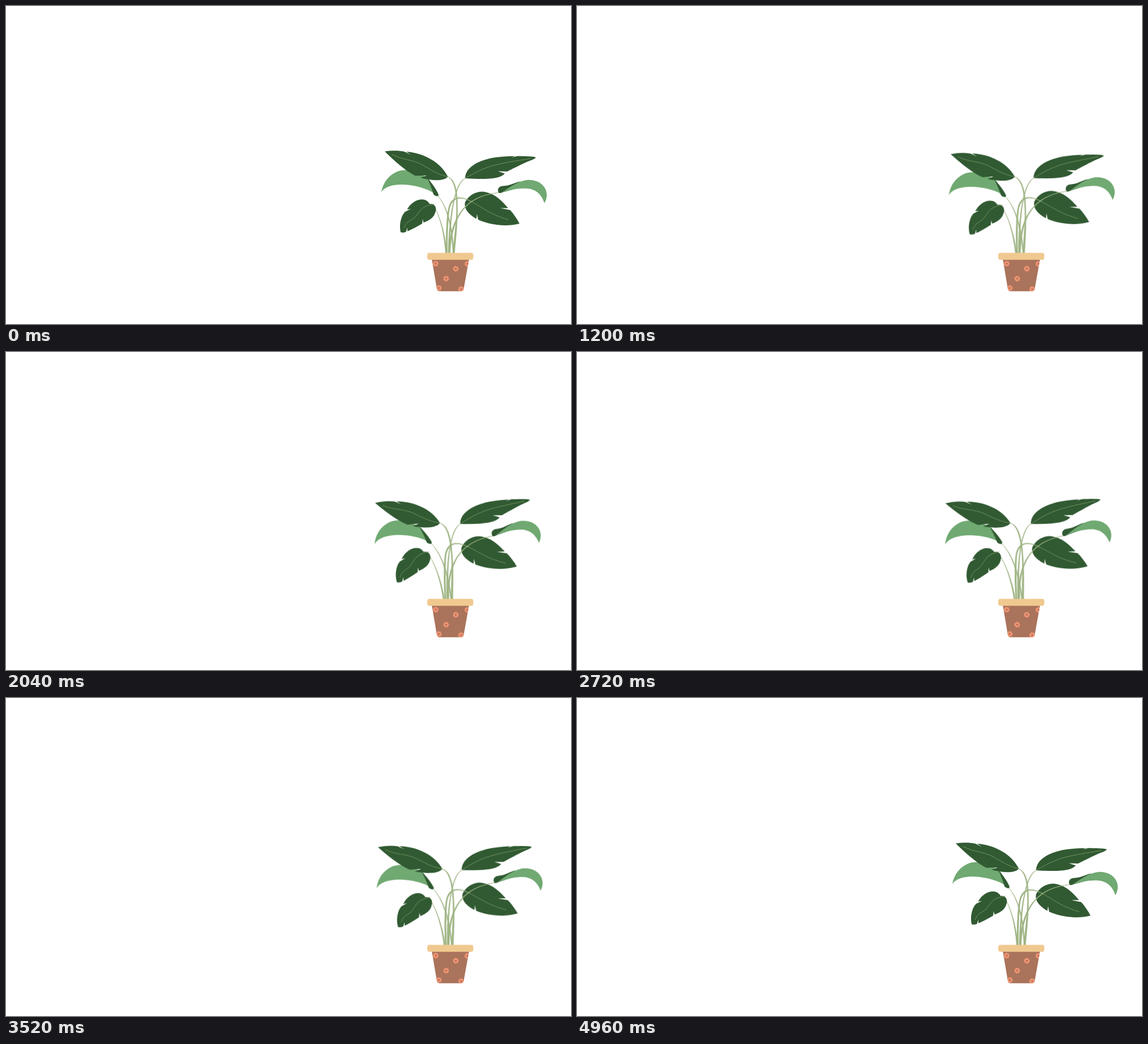
Recreate the animation shown at these times as an HTML page without scripts. Size 998x561 px, loop 5000 ms.

```html
<!DOCTYPE html>
<html lang="en">
<head>
<meta charset="utf-8">
<title>Swaying plant</title>
<style>
  html, body { margin: 0; width: 100%; height: 100%; overflow: hidden; background: #fff; }
  svg { display: block; width: 100%; height: 100%; }
  .dark { fill: #315a32; }
  .light { fill: #70a972; }
  .stem { fill: #9db381; stroke: #9db381; stroke-width: .6; }
  .rib { fill: none; stroke: #86a06d; stroke-width: .8; stroke-linecap: round; }
  .sway {
    transform-origin: var(--pivot);
    animation: sway 2.5s cubic-bezier(.35, 0, .65, 1) infinite alternate;
  }
  @keyframes sway { to { transform: rotate(var(--lean)); } }
</style>
</head>
<body>
<svg viewBox="0 0 998 561">
  <defs>
    <clipPath id="body">
      <path id="potShape" d="M752 446H818L808.500 499Q807.500 503.300 804 503.300H766Q762 503.300 761 499Z"/>
    </clipPath>
    <g id="flower">
      <circle r="3.700" fill="#ea9473" stroke="#ea9473" stroke-width="3.400" stroke-linecap="round" pathLength="7" stroke-dasharray="0 1"/>
      <circle r="1.200" fill="#a8533d"/>
    </g>
  </defs>

  <!-- lower left leaf -->
  <g class="sway" style="--pivot: 788px 490px; --lean: -4.700deg">
    <path class="stem" d="M759 359C771 382 777 412 779.200 440H776.700C775 412 770 382 759 359Z"/>
    <path class="dark" d="M697 399C694 385 698 370 705 363L715 358L708.500 359C715 347 728 339 740 342C745 344 747 347 748 349C756 348 761 354 759 362C756 374 748 378 737.500 382L736 376L735 384C726 389 718 394 709 397.500L709 391L706.500 398.500C703 400 699 400 697 399Z"/>
    <path class="rib" d="M703 391C710 377 714 380 722 373C731 363 733 352 757 349.500"/>
  </g>

  <!-- left drooping leaf -->
  <g class="sway" style="--pivot: 793px 484px; --lean: -5deg">
    <path class="stem" d="M763 335C782 358 789 390 791.500 440H789.500C788 395 781 358 763 335Z"/>
    <path class="light" d="M663.200 328.500C666 307 685 288 707 289.500C725 291 740 300 748 307L762 334C745 322 725 316 700 315C685 315 669 318 663.200 328.500Z"/>
    <path class="dark" d="M744 303C752 312 762 326 764 333C764 337 758 336 755 332C753 324 749 314 744 303Z"/>
  </g>

  <!-- lower right leaf -->
  <g class="sway" style="--pivot: 784px 484px; --lean: -2.900deg">
    <path class="dark" d="M811 346C818 332 835 325 848 328.500C865 332 877 345 887 356.500L873 356.500L890.500 360C897 367 903 376 907 384C885 389 860 388 834 377L832 367L831 375.500C818 368 808 358 811 346Z"/>
    <path class="rib" d="M820 344C840 354 855 368 887 377"/>
    <path class="stem" d="M824 346C806 337 790 334 783.500 357C780.500 375 779.500 405 779.800 440H777.300C777 405 778 375 781.500 357C787 331 808 336 824 346Z"/>
  </g>

  <!-- right drooping leaf -->
  <g class="sway" style="--pivot: 806px 462px; --lean: -5deg">
    <path class="stem" d="M874 329C830 333 787 352 784.500 440H782C784 352 830 332 874 329Z"/>
    <path class="dark" d="M870 329C867 323 871 317 879 317.500C889 317 898 312 908 309.500L894 324L876 329Q872 331 870 329Z"/>
    <path class="light" d="M876 328.500C890 320 903 309 920 307C945 305 964 325 951 348C947 335 938 323 920 322C905 321 890 325 876 328.500Z"/>
  </g>

  <!-- upper right leaf -->
  <g class="sway" style="--pivot: 793px 490px; --lean: -2.900deg">
    <path class="dark" d="M811 304C811 285 835 270 870 266.500C880 265.500 890 265 899 264.800L893 267.200L903 264.800C915 265 931 265 935.500 267C937 269 925 273 918 276C905 282 895 287 885.500 292L869 291.500L881 295.500C873 306 845 306 811 304Z"/>
    <path class="rib" d="M811 304C835 290 850 283 875 278S910 272 926 269"/>
    <path class="stem" d="M811 304C798 312 792 340 788.500 362C785 388 784 412 783.500 440H781C781.500 412 783 388 787 362C791 340 797 310 811 304Z"/>
  </g>

  <!-- upper left leaf -->
  <g class="sway" style="--pivot: 780px 471px; --lean: -5.100deg">
    <path class="dark" d="M669 256.500C680 255 694 254.500 704 257L715 262.500L707 257C738 259 768 276 780.500 301C773 310 751 308 732 303L743 299L723 299.500C704 290 685 272 669 256.500Z"/>
    <path class="rib" d="M682 262C704 273 716 270 735 280C752 290 765 298 780 301"/>
    <path class="stem" d="M780 301C795 306 798 330 797.500 360C797 395 794 415 792 440H789C790.500 415 795 390 795.800 360C796 330 793 308 780 301Z"/>
  </g>

  <!-- pot -->
  <use href="#potShape" fill="#aa735b"/>
  <g clip-path="url(#body)">
    <use href="#flower" x="759" y="454.500"/>
    <use href="#flower" x="794.500" y="463.500"/>
    <use href="#flower" x="815" y="455"/>
    <use href="#flower" x="777.500" y="481"/>
    <use href="#flower" x="764.500" y="497.500"/>
    <use href="#flower" x="804" y="499.500"/>
  </g>
  <path d="M747 435.400H823Q825.500 435.400 825.500 441.500T823 447.700H747Q744 447.700 744 441.500T747 435.400Z" fill="#f0c990"/>
</svg>
</body>
</html>
```
